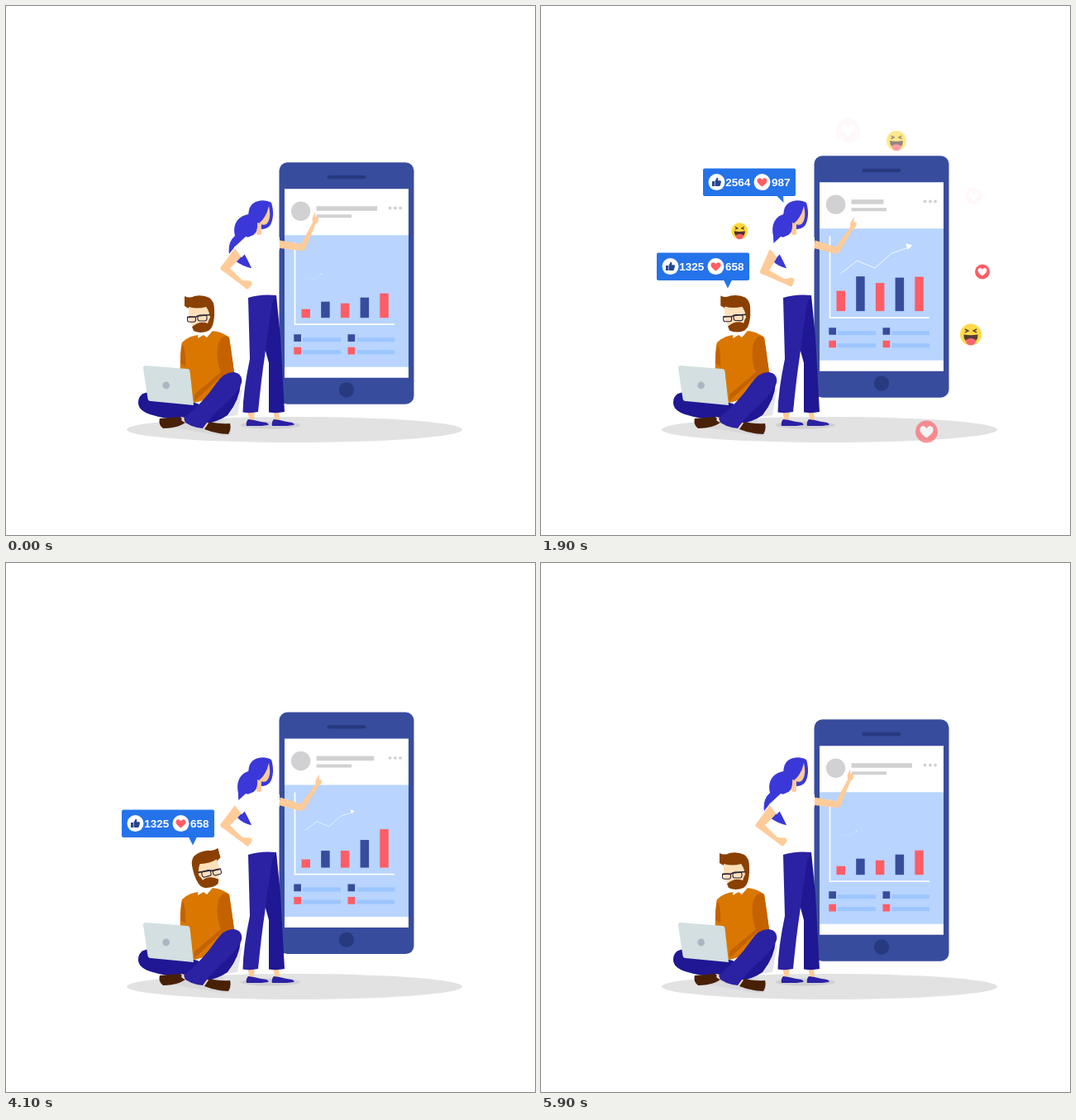
Animation of 640x640 px, one loop 6 s. Source, as an HTML page:

```html
<!DOCTYPE html>
<html lang="en">
<head>
<meta charset="utf-8">
<title>Social media statistics</title>
<style>
  html, body { margin: 0; height: 100%; overflow: hidden; background: #fff; }
  svg { display: block; width: 100vw; height: 100vh; }
  text { font: bold 13.5px "Liberation Sans", Arial, sans-serif; fill: #fff; }
</style>
</head>
<body>
<svg viewBox="0 0 640 640">
  <defs>
    <path id="heart" d="M0 .55C-.3 .32-.62 .08-.6-.2C-.58-.55-.15-.6 0-.28C.15-.6.58-.55.6-.2C.62.08.3.32 0 .55Z"/>
    <g id="like">
      <circle r="10" fill="#fff"/>
      <path fill="#27468f" d="M-5.5-1H-2.6V5H-5.5ZM-2-1L.4-5.5Q2.2-5.4 1.7-1.8H4.6Q5.6-1.5 5.4-.2L4.4 4Q4.1 5 3 5H-2Z"/>
    </g>
    <g id="love">
      <circle r="10" fill="#fff"/>
      <use href="#heart" transform="scale(10)" fill="#ff5d66"/>
    </g>
    <g id="loveIcon">
      <circle r="1" fill="#ff5d66"/>
      <use href="#heart" fill="#fff"/>
    </g>
    <g id="laughIcon">
      <circle r="1" fill="#ffd93d"/>
      <path d="M-.66 0Q0 .12 .66 0Q.68 .72 0 .75Q-.68 .72-.66 0Z" fill="#503230"/>
      <path d="M-.46 .5Q0 .2 .46 .5Q.46 1 0 1Q-.46 1-.46 .5Z" fill="#f5606c"/>
      <path d="M-.55-.5L-.24-.34L-.55-.2M.55-.5L.24-.34L.55-.2" fill="none" stroke="#503230" stroke-width=".11"/>
    </g>
    <g id="userIcon">
      <circle r="1" fill="#5a8cff"/>
      <circle cy="-.43" r=".31" fill="#fff"/>
      <path d="M-.38 .68V.25Q-.36-.1 0-.1Q.36-.1 .38 .25V.68Q0 .8-.38 .68Z" fill="#fff"/>
    </g>
  </defs>

  <ellipse cx="349" cy="512.5" rx="203" ry="15.5" fill="#e2e2e2"/>

  <g id="phone">
    <rect x="330.5" width="163" height="292.5" rx="10" fill="#384c9e"/>
    <rect x="388.5" y="15.5" width="47" height="4.5" rx="2.2" fill="#273a80"/>
    <circle cx="412" cy="275.3" r="9.2" fill="#273a80"/>
    <path d="M337 32H487V260.5H337Z" fill="#fff"/>
    <path d="M337 88H487V247.5H337Z" fill="#b8d4ff"/>
    <g fill="#d1d1d3">
      <circle cx="356.6" cy="59" r="11.7"/>
      <rect id="title" x="375.5" y="53" height="5.6"/>
      <path d="M375.5 63H418V67H375.5Z"/>
      <circle cx="464.6" cy="55.3" r="1.9"/><circle cx="470.9" cy="55.3" r="1.9"/><circle cx="477.1" cy="55.3" r="1.9"/>
    </g>
    <path d="M349.5 97V196H470" fill="none" stroke="#fff" stroke-width="1.7"/>
    <g id="bars"></g>
    <path d="M348.3 208h8.7v8.7h-8.7ZM413.5 208h8.7v8.7h-8.7Z" fill="#384c9e"/>
    <path d="M348.3 223.5h8.7v8.7h-8.7ZM413.5 223.5h8.7v8.7h-8.7Z" fill="#ff5d66"/>
    <path d="M359 212h46v5h-46ZM424.5 212h45.5v5h-45.5ZM359 227h46v5h-46ZM424.5 227h45.5v5h-45.5Z" fill="#9cc6ff"/>
    <g id="trend" fill="none" stroke="#fff">
      <path d="M0 0L23-18L47-8L70-28L93-36"/>
      <path d="M89-41.5L98-39L92-33Z" fill="#fff" stroke="none"/>
    </g>
  </g>

  <g id="woman">
    <ellipse cx="320" cy="507" rx="36" ry="4.5" fill="#cfcfd3"/>
    <path id="tail" fill="#3a38d8"/>
    <path d="M290 281L304 275L323 279L331 280V294L327 302L328 352H293L297 317L289 300L285 304L276 292Z" fill="#fff"/>
    <g fill="#ffcb98">
      <path id="hipArm" d="M277 293L259 317Q260 320 263 321L287 339Q291 343 293 342.5L297.5 337Q298 333 295 332.5L286 332L271 317.5L286 302Z"/>
      <path id="pointArm" d="M331 283.5L357 288L371 262L370.5 257L374 249L374.5 255L378 256Q379 261 374.5 264L362 294Q360 296 357 296L331 293Z"/>
      <path d="M292 490H301L299.5 502H295ZM323 490H330L331 502H326Z"/>
      <path d="M304 258L309 264V276Q306 278 303 276Z"/>
    </g>
    <path d="M276 292L290 279L301 282L289 300L285 304Z" fill="#fff"/>
    <path d="M294 247C297 234 313 233 321 238C324 247 324 259 319 266Q315 270 309 270V264L304 262Q305 274 299 277L290 272Z" fill="#3a38d8"/>
    <path d="M318 242C320 251 320 259 315 264Q311 266 306 263Q315 256 318 242Z" fill="#ffcb98"/>
    <path d="M323 350H327L332 400L337 491Q328 493 318 491.5V432L312 410Z" fill="#1f1793"/>
    <path d="M293 353Q308 348 327 350L322 360Q316 400 313 424Q309 450 305 491Q296 493 286.5 491.5Q287 465 295 427Z" fill="#2b21a3"/>
    <path id="shoe" d="M291 508Q290 503 293 500L300 501Q307 503 315 504Q319 506 317 507L309 508Z" fill="#2b21a3"/>
    <use href="#shoe" x="31"/>
  </g>

  <g id="man">
    <path d="M188 508L262 520Q273 522 272 512L260 500L286 462L280 495Z" fill="#cfcfd3" opacity=".55"/>
    <path d="M211 470Q210 415 213 407Q222 398 236 398L249 393Q262 394 270 401L276 443L250 474L228 480Z" fill="#d97700"/>
    <path d="M257 408Q262 396 270 401Q273 420 276 443Q264 444 256 452L228 478V470L260 443Q253 425 257 408ZM211 432Q211 415 214 409Q218 420 217 436Z" fill="#c46200"/>
    <path d="M233 395L232 402L239 398L243 401L250 393L244 388Z" fill="#fff"/>
    <path d="M160 480Q160 468 174 467L232 481L244 491L216 500Q196 501 174 494Q160 489 160 480Z" fill="#1f1793"/>
    <path d="M284 456Q283 476 268 495Q257 503 240 506L246 486Z" fill="#1f1793"/>
    <path d="M211 497L222 499L217 505ZM238 503L248 505L242 511Z" fill="#ffe0ba"/>
    <path d="M215 499Q240 478 254 457Q264 442 276 443Q287 445 285 456Q280 469 259 487Q246 499 238 511Q226 510 217 504Z" fill="#2b21a3"/>
    <path d="M186 499Q198 498 211 497Q211 502 217 504Q207 511 190 511Q184 506 186 499ZM246 503Q258 506 271 505Q273 512 269 518Q252 517 240 512Z" fill="#482006"/>
    <path d="M169 435L219 439Q222 439 222.5 442L227 483L175 478Q172 478 171.5 475L166 438Q166 435 169 435Z" fill="#d3dfe0"/>
    <circle cx="193.7" cy="459" r="4.4" fill="#adb5c2"/>
    <g id="head">
      <path d="M216 351Q222 354 228 351Q238 349 246 353Q252 357 252 367Q253 384 247 390L228 389L221 366L216 363Z" fill="#8a4000"/>
      <path d="M221 364Q232 367 242 364Q246 369 247 377L244 388L229 390Q223 386 221 378Z" fill="#ffe0ba"/>
      <path d="M225 388Q235 380 244 384Q246 376 251 374Q252 389 245 393Q235 397 227 393Z" fill="#8a4000"/>
      <g fill="none" stroke="#2e2438" stroke-width="1.1">
        <rect x="219.5" y="376" width="10" height="6.3" rx="2.5"/>
        <rect x="232" y="374" width="11" height="7" rx="2.5"/>
        <path d="M219 376.5L230 376L232 375L247 373.5" stroke-width="1.6"/>
      </g>
    </g>
  </g>

  <g id="bubbles"></g>
  <g id="icons"></g>
</svg>

<script>
const $ = id => document.getElementById(id);
const put = (id, transform) => $(id).setAttribute('transform', transform);
const clamp = v => Math.max(0, Math.min(1, v));
const bump = (t, from, to) => Math.sin(Math.PI * clamp((t - from) / (to - from))) ** 2;
// visible between two times, with linear ramps at both ends
const fade = (t, from, to, ramp = 400) => clamp(Math.min(t - from, to - t) / ramp);

// linear interpolation over keyframe times
function track(t, times, values) {
  if (t <= times[0]) return values[0];
  for (let i = 1; i < times.length; i++)
    if (t <= times[i]) {
      const k = (t - times[i - 1]) / (times[i] - times[i - 1]);
      return values[i - 1] + (values[i] - values[i - 1]) * k;
    }
  return values.at(-1);
}

const barTimes = [700, 1900, 3200, 4100, 4700];
const barHeights = [
  [10.5, 24.5, 17.5, 10, 10.5],
  [19.5, 42, 37.5, 20.5, 19.5],
  [17.5, 34, 37.5, 20.5, 17.5],
  [24.5, 40.5, 56, 33.5, 24.5],
  [29.5, 41.5, 71.5, 46.5, 29.5]
];
$('bars').innerHTML = barHeights.map((_, i) =>
  `<rect x="${357.5 + 23.7 * i}" width="10.5" fill="${i % 2 ? '#384c9e' : '#ff5d66'}"/>`).join('');

const bubbles = [
  { x: 196, y: 196.5, likes: 2564, loves: 987, tail: 'M89 33L97.5 41.5L97 33Z', ax: 97, ay: 41.5, from: 310, to: 3600 },
  { x: 140, y: 298.5, likes: 1325, loves: 658, tail: 'M81 33L86 43L91 33Z', ax: 84.5, ay: 41, from: 1120, to: 5000 }
];
$('bubbles').innerHTML = bubbles.map(b => `<g>
  <rect width="112" height="33.5" rx="2" fill="#2573ea"/><path d="${b.tail}" fill="#2573ea"/>
  <use href="#like" x="16.5" y="16.6"/><use href="#love" x="71.5" y="16.6"/>
  <text x="27.2" y="21.4">${b.likes}</text><text x="83" y="21.4">${b.loves}</text></g>`).join('');

// kind, x, y, radius, start, end
const icons = [
  ['love', 371.5, 150, 14.7, 720, 1915],
  ['love', 523.5, 230, 10, 900, 1915],
  ['love', 466.5, 515, 13.5, 1100, 2160],
  ['love', 534, 321.5, 9, 1250, 2350],
  ['laugh', 430, 163, 12, 1050, 2140],
  ['laugh', 240.3, 272.3, 10, 1300, 2400],
  ['laugh', 520, 397.5, 13, 1400, 2280],
  ['user', 483.5, 152, 17, 2450, 3750],
  ['user', 300, 171, 10, 2350, 3460],
  ['user', 528, 470.5, 19.7, 2200, 3280],
  ['user', 378.5, 515.3, 10, 2550, 3590]
];
$('icons').innerHTML = icons.map(([kind, x, y, r]) =>
  `<use href="#${kind}Icon" transform="translate(${x} ${y}) scale(${r})"/>`).join('');

function draw(t) {
  const lift = track(t, [0, 1500, 3000, 4400, 5900], [0, 1, 0, 1, 0]);
  put('phone', `translate(0 ${189.2 - 11 * lift})`);
  $('title').setAttribute('width', track(t, [800, 1900, 2500, 3200, 4200], [73.5, 39, 31, 36.5, 73.5]));
  [...$('bars').children].forEach((bar, i) => {
    const h = track(t, barTimes, barHeights[i]);
    bar.setAttribute('y', 188 - h);
    bar.setAttribute('height', h);
  });
  const grow = track(t, [0, 400, 800, 1900, 2600, 3200, 4100, 4800, 5300, 5900], [.21, .25, .35, .89, 1, 1, .61, .33, .24, .21]);
  put('trend', `translate(362 143) scale(${grow})`);

  put('pointArm', `rotate(${10.5 * lift} 331 288)`);
  put('hipArm', `rotate(${-13.5 * bump(t % 2950, 1130, 2600)} 283 296)`);
  const sway = bump(t, 800, 3000) + bump(t, 3300, 4800);
  const lobe = 277 + 4 * sway, tip = 270 + 13 * sway;
  $('tail').setAttribute('d', `M294 252C${lobe + 2} 254 ${lobe - 3} 266 ${lobe} 278
    Q${tip - 2} 286 ${tip} 300L${tip + 7} 291L${277 + 3 * sway} 308Q286 315 298 317.5L289 301L300 276Z`);

  const dx = track(t, [900, 1900, 3200], [0, 1, 3]);
  put('head', t >= 3600 && t < 5300
    ? 'rotate(-15 238 392) translate(484 0) scale(-1 1)'
    : t >= 5300 ? '' : `translate(${dx} ${-dx * .4}) rotate(${dx * .5} 238 392)`);

  bubbles.forEach((b, i) => {
    const s = fade(t, b.from, b.to);
    $('bubbles').children[i].setAttribute('transform',
      `translate(${b.x + b.ax * (1 - s)} ${b.y + b.ay * (1 - s)}) scale(${s})`);
  });
  icons.forEach(([, , , , from, to], i) =>
    $('icons').children[i].setAttribute('opacity', fade(t, from, to)));
}

function loop() {
  draw(Math.floor(performance.now() % 6000 / 100) * 100);
  requestAnimationFrame(loop);
}
loop();
</script>
</body>
</html>
```
